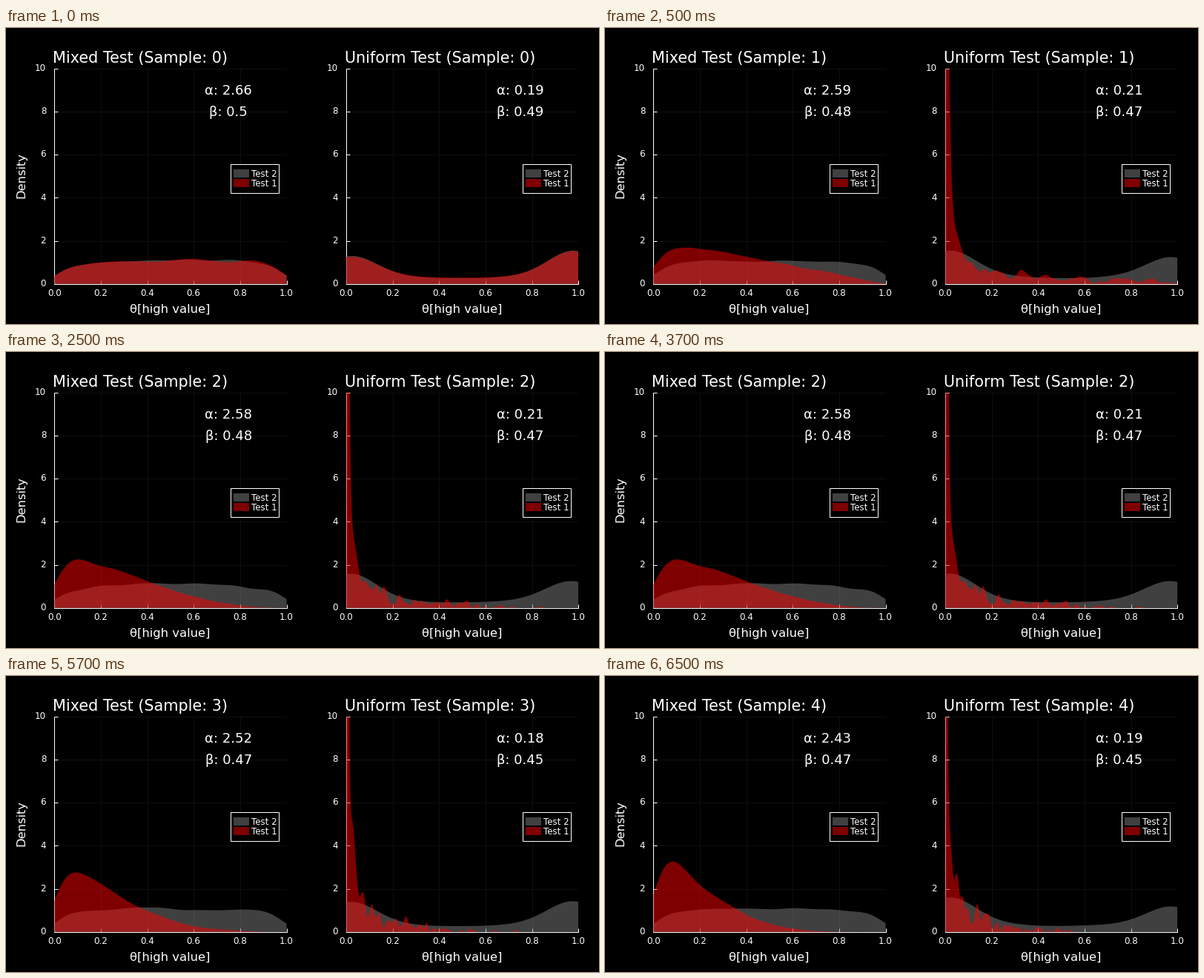
Animation of 800x400 px, one loop 8000 ms. Source, as a matplotlib script:

```python
import numpy as np
import matplotlib.pyplot as plt
from matplotlib.animation import FuncAnimation
from matplotlib.patches import Rectangle

W, H, DPI = 800, 400, 100
AX_W, AX_H, TOP = 313.3, 291, 54.7
PX = 72 / DPI  # points per pixel
GRAY, RED = (0.5, 0.5, 0.5, 0.5), (1, 0, 0, 0.5)
GRID = np.linspace(0, 1, 601)

PARAMS = {
    "Mixed": [(2.66, .5), (2.59, .48), (2.58, .48), (2.52, .47), (2.43, .47)],
    "Uniform": [(.19, .49), (.21, .47), (.21, .47), (.18, .45), (.19, .45)],
}
# Prior mean of the uniform test at each sample
UNIFORM_MEAN = [.54, .46, .44, .505, .44]


def beta_density(a, b, bandwidth, draws, seed):
    """Kernel density of Beta(a, b) draws, as a closed area."""
    x = np.random.default_rng(seed).beta(a, b, draws)
    kernel = np.exp(-0.5 * ((GRID[:, None] - x) / bandwidth) ** 2)
    height = kernel.mean(axis=1) / (bandwidth * np.sqrt(2 * np.pi))
    return np.vstack([(0, 0), np.column_stack([GRID, height]), (1, 0)])


def densities(name, n):
    """Test 2 (the prior) and Test 1 (the posterior after n low values)."""
    if name == "Mixed":
        a = b = 1.15
        prior_width, width, draws = .05, .045, 4000
    else:
        a = .32 * UNIFORM_MEAN[n]
        b = .32 - a
        prior_width = .11
        width, draws = (.013 * n ** -.7, 800) if n else (prior_width, 4000)
    return (beta_density(a, b, prior_width, 4000, [n, 0]),
            beta_density(a, b + n, width, draws, [n, 1]))


plt.rcParams["font.family"] = "DejaVu Sans"
fig = plt.figure(figsize=(W / DPI, H / DPI), dpi=DPI, facecolor="black")
overlay = fig.add_axes([0, 0, 1, 1], zorder=5)
overlay.set(xlim=(0, W), ylim=(H, 0))
overlay.axis("off")


def label(x, y, text, size, ha="center", **kw):
    return overlay.text(x, y, text, fontsize=size * PX, color="white",
                        ha=ha, va="baseline", **kw)


def box(x, y, w, h, **kw):
    overlay.add_patch(Rectangle((x, y), w, h, **kw))


def draw_legend(left):
    box(left + 238, 183.7, 65, 39, fc="black", ec="white", lw=PX)
    for row, (text, color) in enumerate([("Test 2", GRAY), ("Test 1", RED)]):
        box(left + 241.8, 191 + 13 * row, 21, 11, fc=color, lw=0)
        label(left + 265.7, 201 + 13 * row, text, 11.8, "left")


class Panel:
    def __init__(self, name, left):
        self.name = name
        ax = fig.add_axes([left / W, 1 - (TOP + AX_H) / H, AX_W / W, AX_H / H],
                          facecolor="black")
        ax.set(xlim=(0, 1), ylim=(0, 10),
               xticks=np.linspace(0, 1, 6), yticks=range(0, 11, 2))
        ax.set_axisbelow(True)
        ax.grid(color="#0f0f0f", lw=PX)
        ax.tick_params(direction="in", length=5 * PX, width=PX, color="white",
                       labelbottom=False, labelleft=False)
        ax.spines[["top", "right"]].set_visible(False)
        ax.spines[["left", "bottom"]].set(color="white", linewidth=PX, zorder=0.9)
        for k in range(6):
            label(left + AX_W * k / 5, 362.5, f"{k / 5:.1f}", 11.9)
            label(left - 11, TOP + AX_H * (1 - k / 5) + 3.3, str(2 * k), 11.9, "right")
        label(left + AX_W / 2 - .3, 384.5, "θ[high value]", 16.4)
        draw_legend(left)
        self.fills = [ax.fill([0, 1, 1], [0, 0, 0], fc=c, lw=0, zorder=z)[0]
                      for z, c in ((2, GRAY), (3, RED))]
        self.title = label(left - 2.2, 46.6, "", 20.8, "left")
        self.alpha = label(left + .75 * AX_W, 90, "", 18)
        self.beta = label(left + .75 * AX_W, 119, "", 18)
        self.areas = [densities(name, n) for n in range(5)]

    def show(self, sample):
        a, b = PARAMS[self.name][sample]
        self.title.set_text(f"{self.name} Test (Sample: {sample})")
        self.alpha.set_text(f"α: {a}")
        self.beta.set_text(f"β: {b}")
        for fill, points in zip(self.fills, self.areas[sample]):
            fill.set_xy(points)


panels = [Panel("Mixed", 65.2), Panel("Uniform", 458.9)]
label(25, 199, "Density", 16.2, rotation=90, rotation_mode="anchor")


def update(frame):
    # The first sample is held for one step, later ones for four
    for panel in panels:
        panel.show((frame + 3) // 4)


anim = FuncAnimation(fig, update, frames=16, interval=500, init_func=lambda: None,
                     repeat=True, repeat_delay=0)
plt.show()
```
